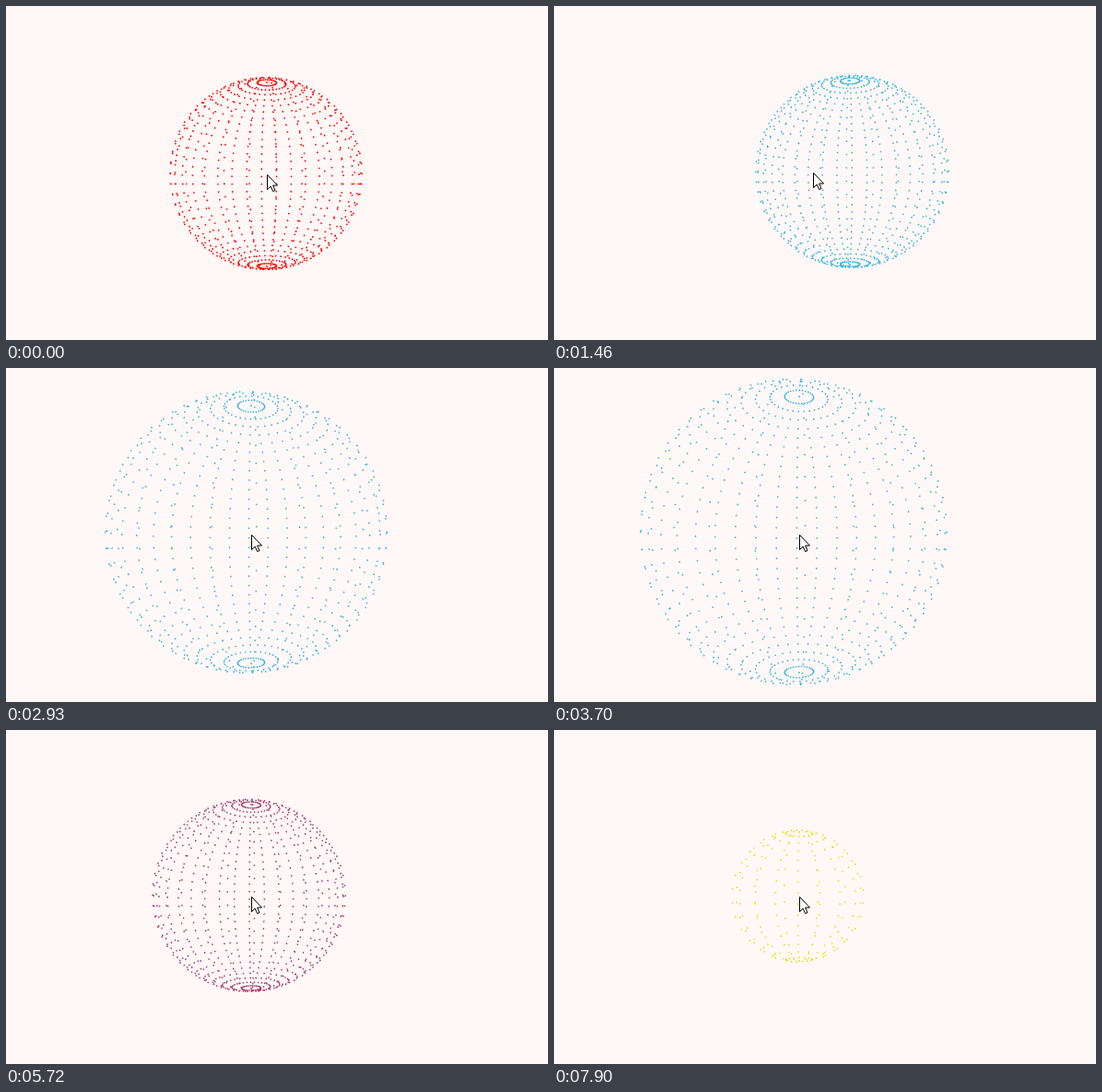
An HTML page with a canvas for the animation above (8000 ms loop, 588 px wide and 363 px high).

```html
<!DOCTYPE html>
<html lang="en">
<head>
<meta charset="utf-8">
<title>Dotted sphere</title>
<style>
  html, body { margin: 0; width: 100%; height: 100%; overflow: hidden; background: #fff8f6; }
  canvas { display: block; }
</style>
</head>
<body>
<canvas id="stage" width="588" height="363"></canvas>
<script>
const ctx = document.getElementById('stage').getContext('2d');
const LOOP = 8000;
const TICK = 76.25;
const FOCAL = 350;
const EYE = { x: 294, y: 194 };
const DOT = 0.9;
const RED = [255, 0, 0], BLUE = [60, 182, 228], CRIMSON = [222, 16, 66], YELLOW = [232, 222, 30];

const clamp = (v, max) => Math.min(Math.max(v, 0), max);

// Number of steps taken by time t: one at start, then one per period, up to count.
const stair = (t, start, period = 1, count = 1) => clamp(Math.floor((t - start) / period) + 1, count);

function ease(t, start, end) {
  const p = clamp((t - start) / (end - start), 1);
  return p * p * (3 - 2 * p);
}

const radius = t => 100
  + 10 * (stair(t, 1840) + stair(t, 2550, 190, 5))
  - 10 * (stair(t, 3700) + stair(t, 4400, 255, 5) + stair(t, 5870, 230, 3));

const divisions = t => 30 - 5 * stair(t, 6570, 210, 4) + 5 * stair(t, 7900);

function color(t) {
  const fade = (from, to, start) => from.map((c, k) => c + (to[k] - c) * stair(t, start, TICK, 3) / 3);
  return fade(fade(fade(RED, BLUE, 610), CRIMSON, 5640), YELLOW, 7430);
}

// The hand swings left, far right, then settles; it moves once per tick.
function hand(t) {
  const s = Math.floor((t - 10) / TICK) * TICK + 10;
  const swing = ease(s, 950, 1380);
  return {
    x: 283 - 24 * ease(s, 789, 933) + 73 * swing - 66 * ease(s, 1413, 1591),
    y: 183 - 2 * swing
  };
}

function drawSphere(center, r, n, rgb) {
  ctx.fillStyle = `rgb(${rgb.map(Math.round)})`;
  ctx.beginPath();
  for (let j = 0; j <= n; j++) {
    const theta = Math.PI * j / n;
    const ring = r * Math.sin(theta);
    const y = center.y - EYE.y - r * Math.cos(theta);
    for (let i = 0; i < n; i++) {
      const phi = 2 * Math.PI * i / n;
      const scale = FOCAL / (FOCAL + ring * Math.sin(phi));
      const px = EYE.x + (center.x - EYE.x + ring * Math.cos(phi)) * scale;
      const py = EYE.y + y * scale;
      ctx.moveTo(px + DOT, py);
      ctx.arc(px, py, DOT, 0, 2 * Math.PI);
    }
  }
  ctx.fill();
}

const arrow = new Path2D('M.5 .5V16.5L4.2 13L6.7 18.5L9 17.5L6.6 12H11.5Z');

function drawPointer({ x, y }) {
  ctx.save();
  ctx.translate(Math.round(x), Math.round(y));
  ctx.fillStyle = '#fff';
  ctx.strokeStyle = '#000';
  ctx.fill(arrow);
  ctx.stroke(arrow);
  ctx.restore();
}

function draw() {
  const t = performance.now() % LOOP;
  ctx.fillStyle = '#fff8f6';
  ctx.fillRect(0, 0, 588, 363);
  drawSphere(hand(t), radius(t), divisions(t), color(t));
  drawPointer(hand(t + TICK)); // the sphere trails the pointer by one tick
  requestAnimationFrame(draw);
}

draw();
</script>
</body>
</html>
```
